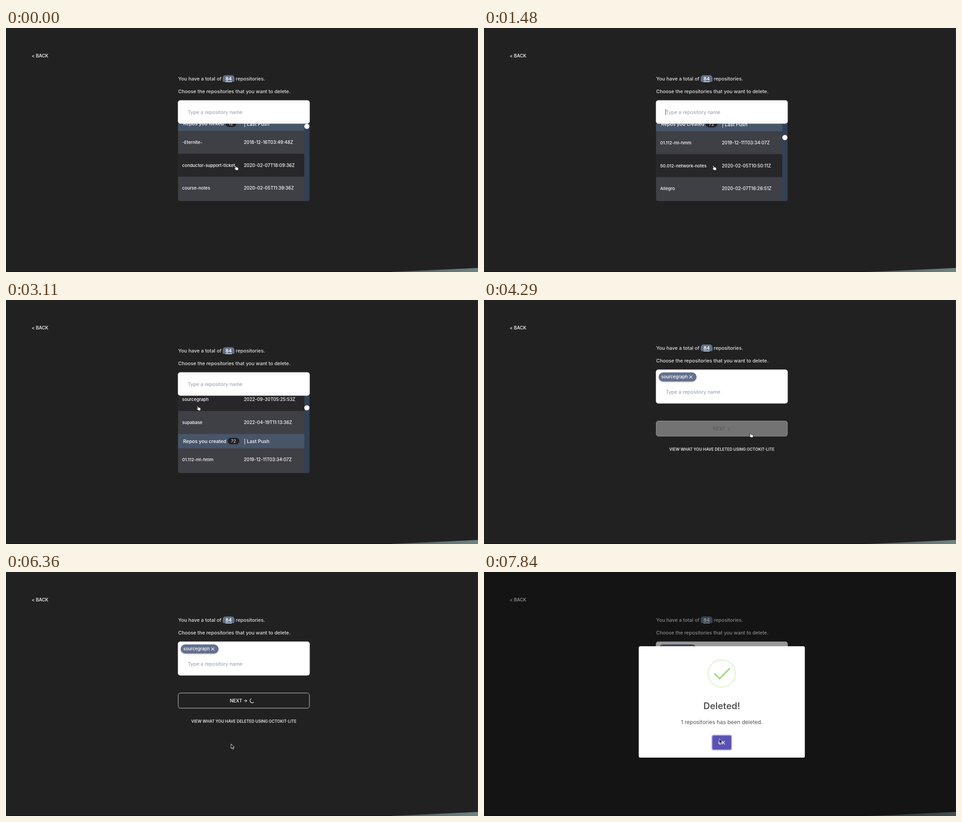
An HTML page with a canvas that plays this animation: 1039 px wide and 539 px high, repeating every 7990 ms.

```html
<!DOCTYPE html>
<html lang="en">
<head>
<meta charset="utf-8">
<title>Delete repositories</title>
<style>
html, body { margin: 0; width: 100%; height: 100%; overflow: hidden; background: #212121; }
canvas { display: block; }
</style>
</head>
<body>
<canvas id="stage" width="1039" height="539"></canvas>
<script>
const ctx = document.getElementById('stage').getContext('2d');
const LOOP = 7990, STEP = 147.96;
const ROW = 50.7, HEAD = 31.5, VIEW = 171.5, TOTAL = 84 * ROW + 2 * HEAD;
const PICKED = 'sourcegraph';

const forked = [
  ['-Eternite-', '2018-12-16T03:49:48Z'],
  ['conductor-support-ticket', '2020-02-07T18:09:36Z'],
  ['course-notes', '2020-02-05T11:39:36Z'],
  ['docusaurus', '2021-03-14T08:22:40Z'],
  ['flask', '2020-06-21T14:05:32Z'],
  ['gatsby', '2020-10-02T09:47:26Z'],
  ['material-ui', '2021-01-25T16:30:58Z'],
  ['next.js', '2021-08-09T07:54:23Z'],
  ['octokit.js', '2022-02-13T12:36:04Z'],
  ['react-select', '2020-04-28T05:20:39Z'],
  [PICKED, '2022-09-30T05:25:53Z'],
  ['supabase', '2022-04-19T11:13:36Z']
];
const created = [
  ['01.112-ml-hmm', '2019-12-11T03:34:07Z'],
  ['50.012-network-notes', '2020-02-05T10:50:11Z'],
  ['Allegro', '2020-02-07T16:26:51Z'],
  ['audio-notes', '2020-03-02T13:08:45Z']
];

// Tracks: [tick, values...]
const scrollTrack = [[0, 15.5], [1, 50], [3, 270], [5, 470], [6, 470], [8, 654.4], [11, 654.4], [19, 575], [21, 555]];
const cursorTrack = [[12, 507, 309], [19, 424, 239], [22, 424, 239], [26, 700, 252], [29, 588, 298.5], [30, 583, 301],
  [31, 563, 292], [34, 563, 292], [35, 562.5, 287], [38, 499, 386], [49, 499, 386], [53, 521.5, 374.5]];

const clamp = v => Math.max(0, Math.min(1, v));

function track(keys, at) {
  if (at <= keys[0][0]) return keys[0].slice(1);
  for (let i = 1; i < keys.length; i++) {
    const a = keys[i - 1], b = keys[i];
    if (at <= b[0]) {
      const k = (at - a[0]) / (b[0] - a[0]);
      return a.slice(1).map((v, j) => v + (b[j + 1] - v) * k);
    }
  }
  return keys[keys.length - 1].slice(1);
}

// y is the middle of the capital letters
function text(s, x, y, size, color, weight = 400, align = 'left') {
  ctx.font = `${weight} ${size}px Inter, sans-serif`;
  ctx.fillStyle = color;
  ctx.textAlign = align;
  ctx.fillText(s, x, y + size * 0.364);
  return ctx.measureText(s).width;
}

function box(x, y, w, h, r, fill, stroke, line = 1) {
  ctx.beginPath();
  ctx.roundRect(x, y, w, h, r);
  if (fill) { ctx.fillStyle = fill; ctx.fill(); }
  if (stroke) { ctx.strokeStyle = stroke; ctx.lineWidth = line; ctx.stroke(); }
}

function backdrop() {
  ctx.fillStyle = '#212121';
  ctx.fillRect(0, 0, 1039, 539);
  ctx.fillStyle = '#191415';
  ctx.fillRect(0, 538, 1039, 1);
  ctx.fillStyle = '#333';
  ctx.fillRect(1038, 0, 1, 539);
  const g = ctx.createLinearGradient(845, 0, 1039, 0);
  g.addColorStop(0, '#4a5656');
  g.addColorStop(1, '#6f8482');
  ctx.fillStyle = g;
  ctx.beginPath();
  ctx.moveTo(845, 539);
  ctx.lineTo(1039, 530);
  ctx.lineTo(1039, 539);
  ctx.fill();
}

function heading(dy) {
  text('< BACK', 56.5, 61.5, 9.9, '#e6e6e6', 600);
  text('You have a total of', 379, 111.6 + dy, 10.8, '#e2e2e2', 500);
  box(477, 104.3 + dy, 26, 14.7, [6, 6, 3, 3], '#61708a');
  text('84', 490, 111.6 + dy, 10.8, '#fff', 600, 'center');
  ctx.fillRect(483, 118 + dy, 14, 1.4);
  text('repositories.', 505.7, 111.6 + dy, 10.8, '#e2e2e2', 500);
  text('Choose the repositories that you want to delete.', 379, 140.1 + dy, 10.8, '#e2e2e2', 500);
}

function search(picked, open, caret) {
  const y = picked ? 153.7 : 159.7, mid = picked ? 203 : 186;
  const h = picked ? 74.8 : 51.6;
  box(378.5, y, 290, h, 5, '#fff');
  box(378.85, y + 0.35, 289.3, h - 0.7, 4.7, null, '#d8d8d8', 0.7);
  if (open) box(385.5, mid - 20, 280, 39, 6, null, '#f3f3f5');
  if (picked) {
    ctx.save();
    ctx.shadowColor = 'rgba(0,0,0,.25)';
    ctx.shadowBlur = 3;
    ctx.shadowOffsetY = 1.5;
    box(384.5, 160, 83.3, 20, 10, '#64718e');
    ctx.restore();
    text(PICKED, 390.3, 170, 9.6, '#fff', 500);
    ctx.strokeStyle = '#fff';
    ctx.lineWidth = 1.1;
    ctx.beginPath();
    ctx.moveTo(452, 166.8); ctx.lineTo(458.4, 173.2);
    ctx.moveTo(458.4, 166.8); ctx.lineTo(452, 173.2);
    ctx.stroke();
  }
  text('Type a repository name', 400, mid, 10.8, '#8f99a8');
  if (caret) {
    ctx.fillStyle = '#333';
    ctx.fillRect(399.5, mid - 7, 0.9, 13.5);
  }
}

function list(top, scroll, picked, hoverX, hoverY) {
  ctx.save();
  ctx.beginPath();
  ctx.roundRect(378.7, top, 289.6, VIEW, [0, 0, 4, 4]);
  ctx.clip();
  ctx.fillStyle = '#3f3f46';
  ctx.fillRect(378, top, 279, VIEW);
  let y = top - scroll;
  const groups = [['Repos you forked', 12, forked], ['Repos you created', 72, created]];
  for (const [label, count, rows] of groups) {
    ctx.fillStyle = '#475569';
    ctx.fillRect(378, y, 279, HEAD);
    const mid = y + HEAD / 2, c = 405.8 + text(label, 390, mid, 10.65, '#fff', 500);
    const w = count === 72 ? 25.5 : 24;
    box(c - w / 2, mid - 7.2, w, 14.4, 7.2, '#202124');
    text(count, c, mid, 9.6, '#eee', 400, 'center');
    text('| Last Push', 523.8, mid + 0.5, 10.65, '#fff', 500);
    y += HEAD;
    for (const [name, date] of rows) {
      if (picked && name === PICKED) continue;
      if (hoverX < 657 && hoverY >= y && hoverY < y + ROW) {
        ctx.fillStyle = '#27272a';
        ctx.fillRect(378, y, 279, ROW);
      }
      text(name, 387.8, y + ROW / 2, 9.6, '#fff', 500);
      text(date, 523.5, y + ROW / 2, 9.85, '#fff', 500);
      y += ROW;
    }
  }
  ctx.fillStyle = '#334155';
  ctx.fillRect(656.7, top, 12, VIEW);
  ctx.fillStyle = '#fff';
  ctx.beginPath();
  ctx.arc(662.3, top + 5.7 + scroll / (TOTAL - VIEW) * (VIEW - 11.4), 5.7, 0, 7);
  ctx.fill();
  ctx.restore();
}

function nextButton(tick) {
  const loading = tick >= 34;
  const [fill, color, edge] = loading || tick < 29 ? [null, '#e6e6e6', '#d0d0d0']
    : tick === 29 ? ['#737373', '#5d5d5d', '#a0a0a0'] : ['#e0e0e0', '#212121', '#e0e0e0'];
  box(379.1, 267.3, 288.8, 33.5, 5, fill, edge);
  text('NEXT →', loading ? 492.7 : 504, 284.3, 10, color, 600);
  if (loading) {
    const a = (tick - 43) * STEP / 2000 * 2 * Math.PI;
    ctx.strokeStyle = color;
    ctx.lineWidth = 1.3;
    ctx.beginPath();
    ctx.arc(542, 284.2, 4.8, a + 0.75, a + 4.3);
    ctx.stroke();
  }
  text('VIEW WHAT YOU HAVE DELETED USING OCTOKIT-LITE', 523.5, 330, 8.65, '#e6e6e6', 600, 'center');
}

// Popup with its pop-in bounce and shrinking exit; body is drawn around the centre
function modal(h, age, exit, body) {
  if (age < 0 || exit >= 1) return;
  ctx.fillStyle = `rgba(0,0,0,${0.4 * clamp(age / 100) * (1 - exit)})`;
  ctx.fillRect(0, 0, 1039, 539);
  const [s] = track([[0, 0.7], [135, 1.05], [240, 0.95], [300, 1]], age);
  ctx.save();
  ctx.globalAlpha = 1 - exit;
  ctx.translate(523.4, 287);
  ctx.scale(s * (1 - exit / 2), s * (1 - exit / 2));
  box(-182.8, -h / 2, 365.6, h, 3.6, '#fff');
  body(age);
  ctx.restore();
}

function button(label, x, y, w, fill, ring, color = '#fff') {
  if (ring) box(x - 1, y - 16.5, w + 2, 33, 3.5, null, ring, 2.1);
  box(x, y - 15.5, w, 31, 3, fill);
  text(label, x + w / 2, y, 10.9, color, 500, 'center');
}

function ring(color) {
  ctx.strokeStyle = color;
  ctx.lineWidth = 2.86;
  ctx.beginPath();
  ctx.arc(0, 0, 30, 0, 7);
  ctx.stroke();
}

function confirmBody(age, tick) {
  const p = clamp(age / 500), e = 1 - (1 - p) ** 1.75, alpha = ctx.globalAlpha;
  ctx.save();
  ctx.translate(0, -71);
  ctx.scale(1, Math.cos((1 - e) * 100 * Math.PI / 180));
  ctx.globalAlpha = alpha * e;
  ring('#facea8');
  const [turn, show] = track([[0, 45, 0], [0.25, -25, 0.4], [0.5, 15, 0.8], [0.75, -5, 1], [1, 0, 1]], p);
  ctx.rotate(turn * Math.PI / 180);
  ctx.globalAlpha *= show;
  text('!', 0, 0, 42, '#f8bb86', 400, 'center');
  ctx.restore();
  text('Are you sure?', 0, 1, 20, '#545454', 600, 'center');
  text('You are about to delete the following repositories:', 0, 37.3, 12, '#545454', 400, 'center');
  text('- ' + PICKED, 0, 52.6, 12, '#545454', 400, 'center');
  const red = tick < 37 ? '#ef4444' : tick < 40 ? '#d73d3d' : '#bf3636';
  button('Yes, confirm delete.', -99.5, 97.4, 130.5, red, '#b1cae3');
  button('Cancel', 38, 97.4, 61.8, '#d6d6d6', null, '#f4f4f4');
}

function doneBody(age, tick) {
  ctx.save();
  ctx.translate(0, -63);
  ring('rgba(165,220,134,.3)');
  const p = clamp((age - 400) / 300);
  if (p > 0) {
    ctx.strokeStyle = '#a5dc86';
    ctx.lineWidth = 3.6;
    ctx.lineCap = 'round';
    ctx.setLineDash([48 * p, 99]);
    ctx.beginPath();
    ctx.moveTo(-15.5, 0.8);
    ctx.lineTo(-4.8, 11.5);
    ctx.lineTo(17, -10.5);
    ctx.stroke();
  }
  ctx.restore();
  text('Deleted!', 0, 9, 20, '#545454', 600, 'center');
  text('1 repositories has been deleted.', 0, 45, 12, '#545454', 400, 'center');
  const violet = tick < 51 ? '#7066e0' : tick < 53 ? '#655cca' : '#5a52b3';
  button('OK', -20.7, 89.7, 41.4, violet, '#b7b2ef');
}

const shapes = {
  hand: [new Path2D('M-2 1L-3.4 -3.6Q-3.2 -5.6 -1.9 -4.6L-.3 -1.6Q.6 -2.4 1.4 -1.4Q2.4 -1.8 2.9 -.7Q4.3 -.9 4.4 .6L4.5 3.2L3.6 5.3L-.6 5.3L-4.4 1.6Q-4.6 -.3 -2 1Z'), '#fff', '#111'],
  arrow: [new Path2D('M-3.6 -6L-3.6 4L-1.2 1.9L.5 5.6L2.2 4.8L.6 1.3L3.8 1.2Z'), '#000', '#fff'],
  beam: [new Path2D('M-2 -5.5Q0 -5.5 0 -4Q0 -5.5 2 -5.5M0 -4L0 4M-2 5.5Q0 5.5 0 4Q0 5.5 2 5.5M-1.2 1.5L1.2 1.5'), null, '#222']
};

function cursorKind(tick) {
  if (tick === 35) return 'beam';
  const onLink = tick < 25 || tick >= 29 && tick < 35 || tick >= 37 && tick < 41;
  return onLink ? 'hand' : 'arrow';
}

function cursor(kind, x, y) {
  const [path, fill, edge] = shapes[kind];
  ctx.save();
  ctx.translate(x, y);
  ctx.lineWidth = 0.9;
  ctx.strokeStyle = edge;
  if (fill) { ctx.fillStyle = fill; ctx.fill(path); }
  ctx.stroke(path);
  ctx.restore();
}

function draw(tick) {
  const t = tick * STEP;
  const picked = tick >= 23, open = tick < 26;
  const [x, y] = track(cursorTrack, tick);
  const [scroll] = track(scrollTrack, tick);
  const lag = tick > 0 && tick < 10 ? 40 : 0; // hover trails while the list moves
  backdrop();
  heading(picked ? -6 : 0);
  if (open) list(picked ? 228 : 211, scroll, picked, x, y - 4 - lag);
  else nextButton(tick);
  search(picked, open, open && (t + 525) % 1000 < 500);
  modal(261.7, t - 5038, clamp((t - 5990) / 150), age => confirmBody(age, tick));
  modal(246, t - 6740, 0, age => doneBody(age, tick));
  cursor(cursorKind(tick), x, y);
}

function play() {
  draw(Math.min(53, Math.floor((performance.now() % LOOP + 8) / STEP)));
  requestAnimationFrame(play);
}
play();
</script>
</body>
</html>
```
